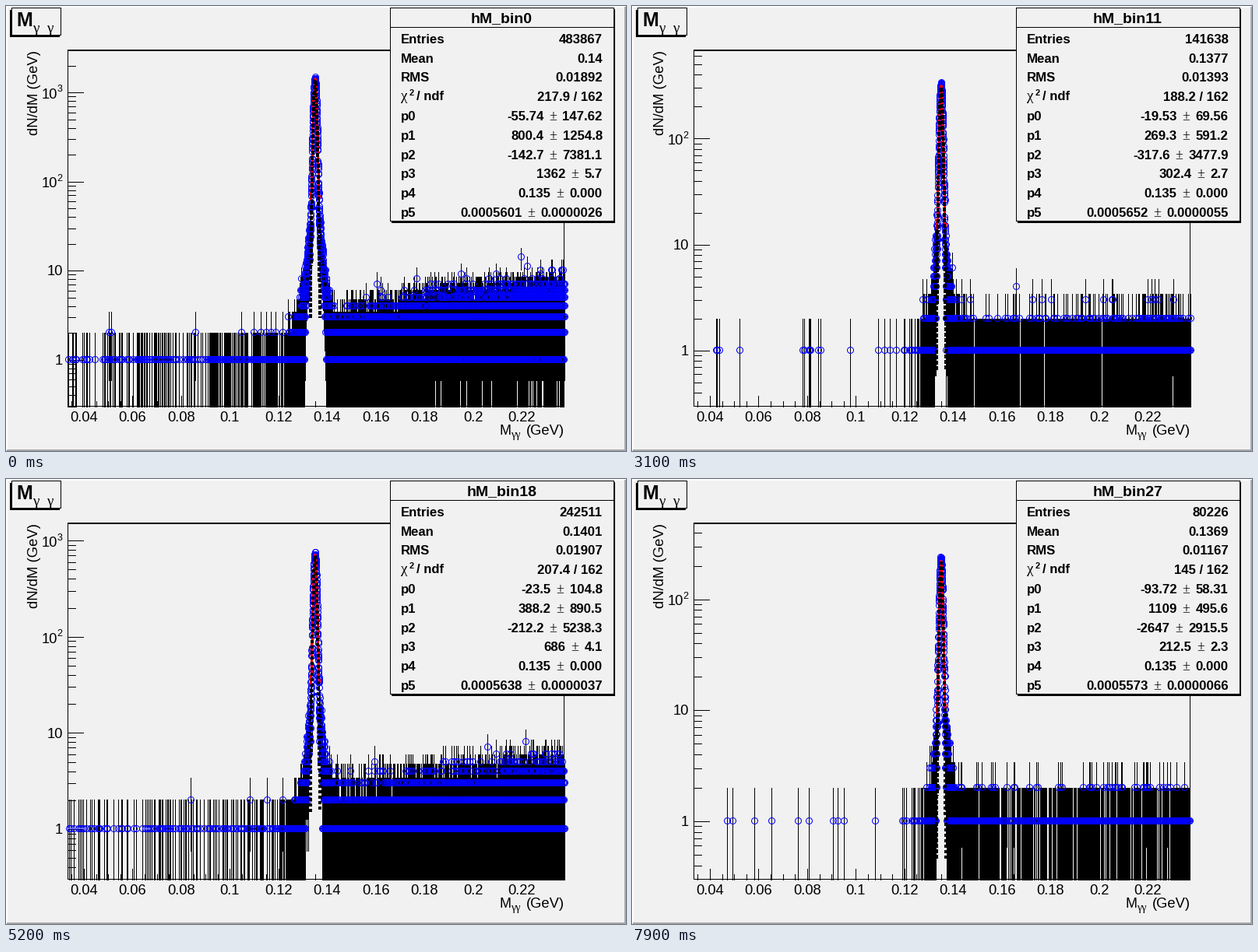
A matplotlib script that plays this animation: 796 by 572 pixels, repeating every 8 s.

```python
import numpy as np
import matplotlib.pyplot as plt
from matplotlib.animation import FuncAnimation
from matplotlib.collections import LineCollection
from matplotlib.patches import Rectangle

W, H, DPI = 796, 572, 100
PX = 72 / DPI
LEFT, RIGHT, TOP, BOTTOM = 79, 716, 57, 514
PER_UNIT = 3122.5            # pixels per GeV on the x axis
LOG_MIN = -0.527
PEAK, BIN_WIDTH, FIT_HALF = 0.135, 2e-5, 0.00168
NDF = 162
PAPER = "#f1f1f1"
SANS, SERIF = "Liberation Sans", "Liberation Serif"

# Key points over the histogram number; all else follows from these
KEY_BINS = [0, 4, 8, 14, 18, 23, 27]
KEYS = {
    "entries": [483867, 215483, 144783, 138493, 242511, 117459, 80226],
    "rms": [.01892, .008198, .01391, .01396, .01907, .00491, .01167],
    "chi2": [217.9, 172.2, 214.6, 161.8, 207.4, 162.5, 145],
    "p1": [800.4, 1009, 11.59, 527, 388.2, 1643, 1109],
    "p2": [-142.7, -2263, -256.2, -379, -212.2, -2794, -2647],
    "p3": [1362, 958.1, 354.3, 250.5, 686, 207.7, 212.5],
}


def x_px(mass):
    return 100 + (mass - 0.04) * PER_UNIT


MASS = np.arange(0.0334, 0.2376, BIN_WIDTH)
MASS_PX = x_px(MASS)


def background(s, mass):
    return s["p0"] + s["p1"] * mass + s["p2"] * mass ** 2


def gauss(s, mass):
    return s["p3"] * np.exp(-0.5 * ((mass - PEAK) / s["p5"]) ** 2)


def fit_state(k, rng):
    s = {name: np.interp(k, KEY_BINS, points) for name, points in KEYS.items()}
    height, spread = s["p3"], s["rms"] ** 2
    root = np.sqrt(height)
    floor = 0.0365 * height
    s["mean"] = PEAK + 14 * spread
    s["p0"] = floor - s["p1"] * PEAK - s["p2"] * PEAK ** 2
    s["p4"] = PEAK
    s["p5"] = rng.normal(5.67e-4, 6e-6)
    s["errors"] = [4 * root, 34 * root, 200 * root, 0.155 * root, 0, 9.6e-5 / root]
    s["top"] = int(height + floor + 1.2 * np.sqrt(height + floor))
    s["noise"] = height * spread * (3 + 7500 * spread)
    return s


def histogram(s, rng):
    """Poisson counts: peak, exponential tails and a rising background."""
    dist = np.abs(MASS_PX - x_px(PEAK))
    core = 0.95 * gauss(s, MASS)
    tails = s["p3"] * (0.088 * np.exp(-dist / 4) + 0.001 * np.exp(-dist / 14))
    high = 1.3 * s["noise"]
    low = high / (1 + 3 * high)
    u = (MASS_PX - LEFT) / (x_px(PEAK) - LEFT)
    t = np.clip((MASS_PX - 410) / (RIGHT - 410), 0, 1) ** 0.8
    flat = np.where(u < 1, 0.016 * high * (0.4 + 1.2 * u), low + (high - low) * t)
    counts = np.minimum(rng.poisson(core + tails + flat), s["top"])
    counts[counts.argmax()] = s["top"]
    return counts


fig = plt.figure(figsize=(W / DPI, H / DPI), dpi=DPI, facecolor=PAPER)
ax = fig.add_axes([0, 0, 1, 1])
# The offsets make whole numbers snap to the pixel of that column and row
ax.set(xlim=(-0.25, W - 0.25), ylim=(H - 0.75, -0.75))
ax.axis("off")


def label(x, y, text="", size=18.4, family=SANS, ha="left", z=4, **kw):
    return ax.text(x, y, text, fontsize=size * PX, family=family, ha=ha,
                   va="baseline", zorder=z, **kw)


def box(x0, y0, x1, y1, fill="black", z=1):
    """Fill the pixels x0..x1, y0..y1, both ends included."""
    ax.add_patch(Rectangle((x0, y0 - 1), x1 - x0 + 1, y1 - y0 + 1, fc=fill, ec="none",
                           antialiased=False, zorder=z))


def framed(x0, y0, x1, y1, z=1):
    box(x0, y0, x1, y1, z=z)
    box(x0 + 1, y0 + 1, x1 - 1, y1 - 1, PAPER, z)


def segments(z=2):
    lines = LineCollection([], colors="black", linewidths=PX, antialiaseds=False, zorder=z)
    return ax.add_collection(lines, autolim=False)


def curve(color, width, z, **kw):
    return ax.plot([], [], color=color, lw=width * PX, antialiased=False, zorder=z,
                   scalex=False, scaley=False, **kw)[0]


# Canvas bevel, plot frame and x axis
box(0, 0, W - 1, 1, "white")
box(0, 0, 1, H - 1, "white")
box(W - 2, 1, W - 1, H - 1, "#a8a8a8")
box(1, H - 2, W - 1, H - 1, "#a8a8a8")
framed(LEFT, TOP, RIGHT, BOTTOM)
box(LEFT, TOP - 1, RIGHT, TOP)
x_ticks = []
for i in range(7, 48):
    x, major = round(x_px(i * 0.005)), i % 4 == 0
    if x < RIGHT:
        x_ticks.append([(x, BOTTOM), (x, BOTTOM - (14 if major else 7))])
        if major:
            label(x, 533, f"{i * 0.005:.3g}", ha="center")
segments().set_segments(x_ticks)
label(633.5, 550.5, "M", 18)
label(648, 554.5, "γγ", 14, SERIF)
label(716.5, 550.5, "(GeV)", ha="right")
label(41, 56.5, "dN/dM (GeV)", 18.5, ha="right", rotation=90, rotation_mode="anchor")

# Title box
box(5, 5, 68, 39, z=8)
framed(7, 2, 70, 37, 9)
label(13, 25, "M", 25, weight="bold", z=10)
label(35, 33, "γ", 19, SERIF, z=10)
label(53, 33, "γ", 19, SERIF, z=10)

# Statistics box
STAT, STAT_RIGHT = 16.8, 765.5


def bold(x, y, text="", size=STAT, ha="left"):
    return label(x, y, text, size, ha=ha, z=10, weight="bold")


box(495, 4, 781, 278, z=8)
framed(493, 2, 780, 276, 9)
box(493, 27, 780, 27, z=10)
header = bold(636, 20.5, size=19.5, ha="center")
row_y = [47 + 24.8 * i for i in range(10)]
for y, name in zip(row_y, ["Entries", "Mean", "RMS", None] + [f"p{i}" for i in range(6)]):
    if name:
        bold(506.5, y, name)
    else:
        label(506.5, y - 1, "χ", 19, SERIF, z=10)
        bold(517, y - 7, "2", 11)
        bold(526.5, y - 1, "/ ndf")
summary = [bold(STAT_RIGHT, y, ha="right") for y in row_y[:4]]
values = [bold(0, y, ha="right") for y in row_y[4:]]
signs = [label(0, y, "±", 18, SERIF, "center", 10) for y in row_y[4:]]
errors = [bold(STAT_RIGHT, y, ha="right") for y in row_y[4:]]

# Parts redrawn for each histogram
y_ticks, bars = segments(), segments(z=3)
circles = curve("blue", 1, 4, ls="none", marker="o", ms=8 * PX, mfc="none", mew=PX)
fit_line = curve("red", 2, 5)
base_line = curve("blue", 2, 5)
peak_line = curve("black", 3, 6, ls=(0, (1, 1)), dash_capstyle="butt")
y_labels = [(label(0, 0, ha="right"), label(72.5, 0, size=12.5, ha="right")) for _ in range(4)]


def show_parameter(i, value, error):
    text = f"{value:.4g}"
    decimals = max(1, len(text.partition(".")[2]))
    err = f"{error:.{decimals}f}"
    start = STAT_RIGHT - STAT * (0.556 * (len(err) - 1) + 0.278)
    values[i].set_text(text)
    values[i].set_x(start - 24)
    signs[i].set_x(start - 12.5)
    errors[i].set_text(err)


def show_y_axis(y_px, log_max):
    ticks = []
    for power in range(-1, 4):
        for m in range(1, 10):
            if LOG_MIN < power + np.log10(m) < log_max:
                y = round(float(y_px(m * 10.0 ** power)))
                ticks.append([(LEFT, y), (LEFT + (20 if m == 1 else 10), y)])
    y_ticks.set_segments(ticks)
    for power, (base, exponent) in enumerate(y_labels):
        y = float(y_px(10.0 ** power))
        raised = power > 1
        base.set_text("10" if power else "1")
        base.set_position((65.5 if raised else 73, y + (8 if raised else 6.5)))
        exponent.set_text(str(power) if raised else "")
        exponent.set_y(y - 0.5)
        for part in (base, exponent):
            part.set_visible(power < log_max)


def show_histogram(k):
    rng = np.random.default_rng(100 + k)
    s = fit_state(k, rng)
    log_max = np.log10(2 * s["top"])
    decade = (BOTTOM - TOP) / (log_max - LOG_MIN)

    def y_px(n):
        logs = np.log10(np.maximum(n, 1e-9))
        return BOTTOM - decade * (np.maximum(logs, LOG_MIN) - LOG_MIN)

    show_y_axis(y_px, log_max)
    counts = histogram(s, rng)
    filled = counts > 0
    columns = np.round(MASS_PX[filled]).astype(int)
    x, n = np.unique(np.column_stack([columns, counts[filled]]), axis=0).T
    low, high = y_px(n - np.sqrt(n)), y_px(n + np.sqrt(n))
    bars.set_segments(np.stack([np.column_stack([x, low]), np.column_stack([x, high])], axis=1))
    circles.set_data(x, np.round(y_px(n)) - 0.5)

    fit = np.linspace(PEAK - FIT_HALF, PEAK + FIT_HALF, 121)
    wide = PEAK + s["p5"] * np.linspace(-3.5, 3.5, 141)
    fit_line.set_data(x_px(fit), y_px(gauss(s, fit) + background(s, fit)))
    base_line.set_data(x_px(fit), y_px(background(s, fit)))
    peak_line.set_data(x_px(wide), y_px(gauss(s, wide)))

    header.set_text(f"hM_bin{k}")
    texts = (f"{s['entries']:.0f}", f"{s['mean']:.4g}", f"{s['rms']:.4g}",
             f"{s['chi2']:.4g} / {NDF}")
    for item, text in zip(summary, texts):
        item.set_text(text)
    for i, error in enumerate(s["errors"]):
        show_parameter(i, s[f"p{i}"], error)


def update(frame):
    show_histogram((frame + 2) // 3)
    return []


anim = FuncAnimation(fig, update, frames=80, interval=100, repeat=True, repeat_delay=0,
                     blit=False, cache_frame_data=False)
plt.show()
```
